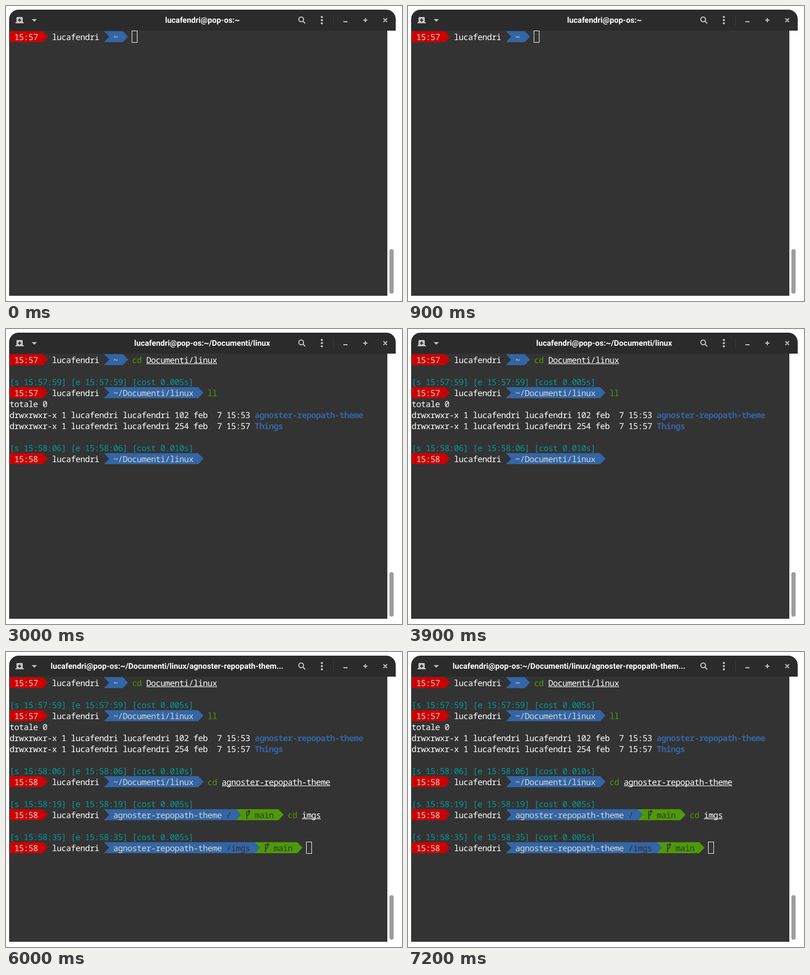
An HTML page that plays this animation: 756 px wide and 563 px high, repeating every 8000 ms.

```html
<!DOCTYPE html>
<html lang="it">
<head>
<meta charset="utf-8">
<title>Terminal</title>
<style>
  html, body { margin: 0; width: 100%; height: 100%; overflow: hidden; background: #fff; }
  svg { display: block; }
  text { white-space: pre; text-rendering: geometricPrecision; }
  #screen { font: 16px "Noto Sans Mono", "DejaVu Sans Mono", monospace; letter-spacing: -0.6px; }
  #title { font: 700 15px Roboto, "Open Sans", sans-serif; fill: #fff; text-anchor: middle; }
</style>
</head>
<body>
<svg id="stage" width="756" height="563" viewBox="0 0 756 563">
  <path d="M6 47V25A18 18 0 0 1 24 7H726A18 18 0 0 1 744 25V47Z" fill="#2b2b2b"/>
  <rect x="6" y="47" width="722" height="506" fill="#333"/>
  <rect x="732" y="464" width="8" height="85" rx="4" fill="#9d9d9d"/>
  <text id="title" y="32"></text>

  <g fill="#c4c4c4">
    <path d="M21.5 21H30.5Q32 21 32 22.5V31H34V33H18V31H20V22.5Q20 21 21.5 21Z"/>
    <path d="M49 25H59L54 30Z"/>
    <circle cx="603" cy="21" r="2.1"/>
    <circle cx="603" cy="27" r="2.1"/>
    <circle cx="603" cy="33" r="2.1"/>
  </g>
  <path d="M26 24V30M23 27H29" stroke="#2b2b2b" stroke-width="2"/>
  <path d="M625.5 17V38" stroke="#3c3c3c"/>
  <g fill="none" stroke="#c4c4c4" stroke-width="2">
    <circle cx="563.5" cy="25.5" r="4.5"/>
    <path d="M566.8 28.8L571.2 33.2M644 30H652M682 27H690M686 23V31M720.5 23.5L727.5 30.5M727.5 23.5L720.5 30.5"/>
  </g>

  <g id="screen"></g>
  <rect id="cursor"/>
</svg>
<script>
const USER = 'lucafendri';
const CELL = 9, LINE = 21, LOOP = 8000;
const RED = '#cc0000', BLUE = '#3465a4', GREEN = '#4e9a06', CYAN = '#06989a';
const WHITE = '#fff', PALE = '#d3d7cf', DARK = '#2e3436', BACK = '#333';

const colX = col => 7 + col * CELL;
const rowY = row => 48 + row * LINE;
const screen = document.getElementById('screen');
const title = document.getElementById('title');
const cursor = document.getElementById('cursor');

function set(node, attrs) {
  for (const name in attrs) node.setAttribute(name, attrs[name]);
  return node;
}

function add(parent, tag, attrs) {
  return parent.appendChild(set(document.createElementNS('http://www.w3.org/2000/svg', tag), attrs));
}

// title centre, title path, cursor cell and cursor style for each step
const steps = [
  { start: 0, center: 375, path: '', col: 26, row: 0 },
  { start: 1500, center: 374.5, path: '/Documenti/linux', col: 42, row: 3 },
  { start: 3000, center: 374.5, path: '/Documenti/linux', hidden: true },
  { start: 4500, center: 310, path: '/Documenti/linux/agnoster-repopath-theme', col: 59, row: 12, solid: true },
  { start: 6000, center: 307.5, path: '/Documenti/linux/agnoster-repopath-them...', col: 63, row: 15 }
];
const layers = steps.map(() => add(screen, 'g', {}));

function write(layer, row, col, text, fill, extra) {
  add(layer, 'text', { x: colX(col) - 0.3, y: rowY(row) + 17, fill, ...extra }).textContent = text;
}

function block(layer, row, col, length, fill) {
  add(layer, 'rect', { x: colX(col), y: rowY(row), width: length * CELL, height: LINE, fill });
}

function arrow(layer, row, col, fill) {
  add(layer, 'path', { d: `M${colX(col)} ${rowY(row)}l10 10.5l-10 10.5z`, fill });
}

function prompt(layer, row, time, path, sub = '', branch = '') {
  block(layer, row, 0, 7, RED);
  arrow(layer, row, 7, RED);
  write(layer, row, 1, time, PALE);
  write(layer, row, 9, USER, WHITE);

  const subCol = 23 + path.length;
  const end = sub ? subCol + sub.length + 1 : subCol;
  block(layer, row, 20, end - 20, BLUE);
  arrow(layer, row, 20, BACK);
  write(layer, row, 22, path, PALE);
  write(layer, row, subCol, sub, DARK);
  if (branch) {
    const branchEnd = end + 5 + branch.length;
    block(layer, row, end, branchEnd - end, GREEN);
    arrow(layer, row, branchEnd, GREEN);
    add(layer, 'path', {
      d: 'M2.5 3V19M2.5 15C2.5 11 7 12 7 8V3M4.7 5.5L7 2.5L9.3 5.5',
      transform: `translate(${colX(end + 2)} ${rowY(row)})`,
      fill: 'none', stroke: DARK, 'stroke-width': 1.8
    });
    write(layer, row, end + 4, branch, DARK);
  }
  arrow(layer, row, end, BLUE);
}

function command(layer, row, col, name, folder = '') {
  write(layer, row, col, name, GREEN);
  if (!folder) return;
  write(layer, row, col + 3, folder, WHITE);
  add(layer, 'rect', { x: colX(col + 3), y: rowY(row) + 18, width: folder.length * CELL, height: 1, fill: WHITE });
}

function timing(layer, row, time, cost) {
  write(layer, row, 0, `[s ${time}] [e ${time}] [cost ${cost}s]`, CYAN);
}

function listing(layer, row, size, time, name) {
  write(layer, row, 0, `drwxrwxr-x 1 ${USER} ${USER} ${size} feb  7 ${time}`, WHITE);
  write(layer, row, 52, name, BLUE, { 'font-weight': 700 });
}

const [home, linux, list, repo, imgs] = layers;
const theme = 'agnoster-repopath-theme';

prompt(home, 0, '15:57', '~');

command(linux, 0, 26, 'cd', 'Documenti/linux');
timing(linux, 2, '15:57:59', '0.005');
prompt(linux, 3, '15:57', '~/Documenti/linux');

command(list, 3, 42, 'll');
write(list, 4, 0, 'totale 0', WHITE);
listing(list, 5, 102, '15:53', theme);
listing(list, 6, 254, '15:57', 'Things');
timing(list, 8, '15:58:06', '0.010');
prompt(list, 9, '15:58', '~/Documenti/linux');

command(repo, 9, 42, 'cd', theme);
timing(repo, 11, '15:58:19', '0.005');
prompt(repo, 12, '15:58', theme, '/', 'main');

command(imgs, 12, 59, 'cd', 'imgs');
timing(imgs, 14, '15:58:35', '0.005');
prompt(imgs, 15, '15:58', theme, '/imgs', 'main');

function show(index) {
  const { center, path, col, row, solid, hidden } = steps[index];
  layers.forEach((layer, i) => set(layer, { visibility: i <= index ? 'visible' : 'hidden' }));
  set(title, { x: center }).textContent = `${USER}@pop-os:~${path}`;
  set(cursor, { visibility: hidden ? 'hidden' : 'visible' });
  if (hidden) return;
  const grow = solid ? 0 : 0.5;
  set(cursor, {
    x: colX(col) - grow, y: rowY(row) - grow,
    width: CELL + 2 * grow, height: LINE + 2 * grow,
    fill: solid ? '#f2f2f2' : 'none', stroke: solid ? 'none' : WHITE
  });
}

let shown = -1;
function tick() {
  const time = performance.now() % LOOP;
  const index = steps.filter(step => step.start <= time).length - 1;
  if (index !== shown) show(shown = index);
  requestAnimationFrame(tick);
}
tick();
</script>
</body>
</html>
```
